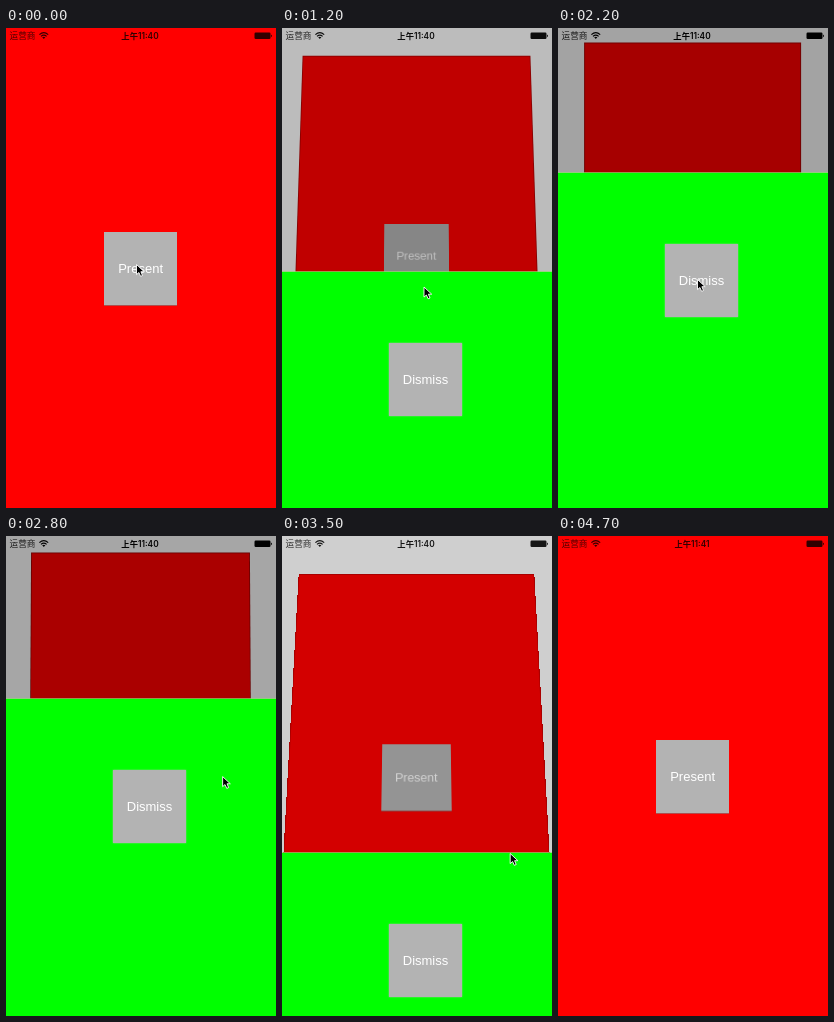
Write an HTML page that moves like this. It is 270 px wide and 480 px high and loops after 4.8 s.

```html
<!DOCTYPE html>
<html lang="zh">
<head>
<meta charset="utf-8">
<title>Present and dismiss</title>
<style>
html, body { margin: 0; width: 100%; height: 100%; overflow: hidden; }
#stage { position: relative; width: 270px; height: 480px; overflow: hidden; background: #fafafa; }
#stage > * { position: absolute; left: 0; top: 0; width: 270px; height: 480px; }
#stage > #back { left: -.7px; top: -.4px; width: 271px; height: 481px; background: #f00; }
#edge { position: absolute; inset: 0; box-shadow: inset 0 0 0 1px rgba(0, 0, 0, .4); }
#shade { background: #000; }
#sheet { background: #0f0; }
#lip { position: absolute; left: 0; top: -1px; width: 100%; height: 1px; background: rgba(140, 220, 110, .7); }
.btn {
  position: absolute; width: 72.6px; height: 72.6px; background: #b3b3b3; color: #fff;
  font: 13px/73px "Liberation Sans", Arial, sans-serif; text-align: center; white-space: nowrap;
}
#back .btn { left: 99px; top: 204.6px; box-shadow: 0 .7px 0 #8c7070; }
#sheet .btn { left: 107px; top: 71px; height: 73px; width: 73px; box-shadow: 0 0 1.5px #a5c8a5; }
text { font-family: Inter, "Noto Sans CJK SC", "Noto Sans CJK", sans-serif; }
</style>
</head>
<body>
<div id="stage">
  <div id="back"><div class="btn">Present</div><div id="edge"></div></div>
  <div id="shade"></div>
  <div id="sheet"><div id="lip"></div><div class="btn">Dismiss</div></div>
  <svg viewBox="0 0 270 480">
    <g id="status">
      <text x="3.5" y="11" font-size="8.64" opacity=".85">运营商</text>
      <g fill="none" stroke="#000" stroke-width="1.2">
        <path d="M33.4 6.6Q37.8 2.6 42.2 6.6"/>
        <path d="M35 8.4Q37.8 5.8 40.6 8.4"/>
      </g>
      <path d="M36.2 9.3Q37.8 8 39.4 9.3L37.8 11.1Z"/>
      <text id="clock" x="134" y="11" font-size="8.3" font-weight="600" text-anchor="middle"></text>
      <rect x="248.5" y="4.5" width="16" height="6.5" rx="1.2"/>
      <path d="M265 6.4Q267 7.8 265 9.2Z"/>
    </g>
    <path id="cursor" d="M.5 .5V10.6L2.9 8.5L4.6 12.3L6.5 11.5L4.9 7.7H8.2Z"
      fill="#000" stroke="#fff" stroke-width=".9" stroke-linejoin="round"/>
  </svg>
</div>
<script>
const LOOP = 4800, STEP = 100, H = 480, REST = 145, GRAB = 231.25;
const $ = id => document.getElementById(id);
const mix = (a, b, k) => a + (b - a) * k;
const clamp = v => Math.min(1, Math.max(0, v));
const ease = (t, start, dur) => (1 - Math.cos(Math.PI * clamp((t - start) / dur))) / 2;

// [time, x, y] of the pointer tip
const path = [
  [0, 130, 236], [300, 130, 236], [600, 148, 249], [700, 146, 261], [800, 141.5, 258.5],
  [1200, 141.5, 258.5], [1600, 139, 251], [2200, 139, 251], [2700, 214, GRAB],
  [3100, 222.5, 266.5], [3500, 227.7, 317], [3700, 228, 327], [4300, 228, 327], [4400, 230, 329]
];

function pointer(t) {
  const i = path.findIndex(p => p[0] > t);
  if (i < 0) return path[path.length - 1].slice(1);
  const a = path[i - 1], b = path[i], k = (t - a[0]) / (b[0] - a[0]);
  return [mix(a[1], b[1], k), mix(a[2], b[2], k)];
}

// The sheet travels twice as far as the finger.
const dragged = y => clamp(2 * (y - GRAB) / (H - REST));

// 0 = sheet fully presented, 1 = dismissed
function dismissal(t, y) {
  if (t < 1000) return 1 - ease(t, 58, 300);
  if (t < 1800) return ease(t, 1090, 300);
  if (t < 2700) return 1 - ease(t, 1900, 300);
  if (t < 3800) return dragged(y);
  return mix(dragged(327), 1, ease(t, 3750, 400));
}

// Pushed back flat -> tilted -> full screen
function backTransform(p) {
  const a = clamp(p * 2), b = clamp(p * 2 - 1);
  const scale = b > 0 ? mix(.95, 1, b) : mix(.8, .95, a);
  const angle = b > 0 ? 15 * (1 - b) : 15 * a;
  const shift = -.07 * H * (1 - a);
  return `perspective(648px) translateY(${shift}px) scale(${scale}) rotateX(${angle}deg)`;
}

function draw(time) {
  const t = Math.floor(time % LOOP / STEP) * STEP;
  const [x, y] = pointer(t);
  const p = dismissal(t, y);
  const presenting = t < 1000 || (t >= 1800 && t < 2700);
  $("back").style.transform = p < 1 ? backTransform(presenting ? p ** 1.25 : p) : "none";
  $("edge").style.opacity = 1 - p;
  $("shade").style.opacity = .35 * (1 - p);
  $("sheet").style.transform = `translateY(${Math.round(mix(REST, H, p))}px)`;
  $("sheet").style.visibility = p < 1 ? "visible" : "hidden";
  $("status").setAttribute("opacity", mix(1, .8, p));
  $("clock").textContent = t < 4700 ? "上午11:40" : "上午11:41";
  $("cursor").setAttribute("transform", `translate(${x} ${y})`);
  $("cursor").setAttribute("visibility", t < 4500 ? "visible" : "hidden");
}

const begin = performance.now();
function tick() {
  draw(performance.now() - begin);
  requestAnimationFrame(tick);
}
tick();
</script>
</body>
</html>
```
